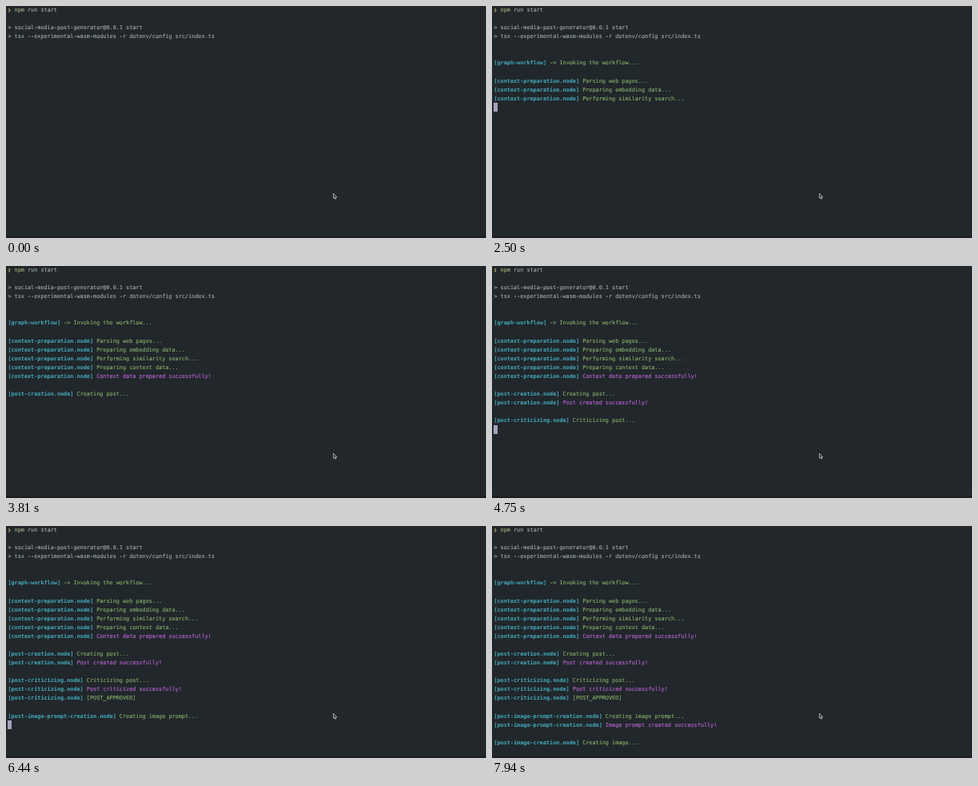
An HTML page that plays this animation: 600 by 290 pixels, repeating every 8 s.

```html
<!DOCTYPE html>
<html lang="en">
<head>
<meta charset="utf-8">
<title>Terminal run</title>
<style>
  :root { --row: 11.08px; --loop: 8s; }

  html, body {
    margin: 0;
    width: 100%;
    height: 100%;
    overflow: hidden;
    background: #21272b;
  }

  .stage {
    position: relative;
    width: 600px;
    height: 290px;
    overflow: hidden;
    background: #21272b;
  }

  /* The log grows by whole rows; the caret sits on the row below it. */
  .log {
    position: absolute;
    left: 2.4px;
    top: 0;
    width: 590px;
    animation: print var(--loop) step-end infinite;
  }

  pre {
    margin: 0;
    height: 100%;
    overflow: hidden;
    font: 6.827px/var(--row) "DejaVu Sans Mono", "Noto Sans Mono", monospace;
    text-rendering: geometricPrecision;
    color: #a9afb3;
    -webkit-text-stroke: .1px currentColor;
  }

  b { color: #45abbd; -webkit-text-stroke: 0; }
  i { font-style: normal; color: #8bb56c; }
  em { font-style: normal; color: #ab5fc2; -webkit-text-stroke: .2px currentColor; }
  .cmd { color: #adb87c; }

  .sign {
    display: inline-block;
    width: 4.11px;
    font-size: 5.6px;
    line-height: 1;
    color: #c6bb60;
    -webkit-text-stroke: .3px currentColor;
  }

  .caret {
    position: absolute;
    left: 0;
    top: calc(100% - .5px);
    width: 4.5px;
    height: 10.8px;
    background: #a5a3c0;
    animation: blink var(--loop) linear infinite;
  }

  .edge {
    position: absolute;
    left: 0;
    bottom: 0;
    width: 100%;
    height: 2px;
    background: #1a1c1f;
  }

  .pointer { position: absolute; left: 408px; top: 233px; }

  @keyframes print {
    0%      { height: calc(4 * var(--row)); }
    .75%    { height: calc(9 * var(--row)); }
    21.875% { height: calc(10 * var(--row)); }
    26.625% { height: calc(11 * var(--row)); }
    38.25%  { height: calc(15 * var(--row)); }
    56.25%  { height: calc(18 * var(--row)); }
    66.375% { height: calc(22 * var(--row)); }
    87.875%, 100% { height: calc(25 * var(--row)); }
  }

  /* Soft blink, one second long, restarted when new rows are printed. */
  @keyframes blink {
    0%, .74%, 3.125%, 5.5%, 13.25%, 18%, 33.625%, 38.24%, 45.25%, 50%,
    63.25%, 66.37%, 73.375%, 78.125%, 85.875%, 87.87%, 94.875%, 100% { opacity: 0; }
    .75% { opacity: .75; }
    7%, 11.75%, 19.5%, 32.125%, 38.25%, 43.75%, 51.5%, 61.75%,
    66.375%, 71.875%, 79.625%, 84.375%, 87.875%, 93.375% { opacity: 1; }
  }
</style>
</head>
<body>
<div class="stage">
  <div class="log">
<pre><span class="sign">❯</span> <span class="cmd">npm</span> run start

&gt; social-media-post-generator@0.0.1 start
&gt; tsx --experimental-wasm-modules -r dotenv/config src/index.ts


<b>[graph-workflow]</b> <i>-&gt; Invoking the workflow...</i>

<b>[context-preparation.node]</b> <i>Parsing web pages...</i>
<b>[context-preparation.node]</b> <i>Preparing embedding data...</i>
<b>[context-preparation.node]</b> <i>Performing similarity search...</i>
<b>[context-preparation.node]</b> <i>Preparing context data...</i>
<b>[context-preparation.node]</b> <em>Context data prepared successfully!</em>

<b>[post-creation.node]</b> <i>Creating post...</i>
<b>[post-creation.node]</b> <em>Post created successfully!</em>

<b>[post-criticizing.node]</b> <i>Criticizing post...</i>
<b>[post-criticizing.node]</b> <em>Post criticized successfully!</em>
<b>[post-criticizing.node]</b> <i>[POST_APPROVED]</i>

<b>[post-image-prompt-creation.node]</b> <i>Creating image prompt...</i>
<b>[post-image-prompt-creation.node]</b> <em>Image prompt created successfully!</em>

<b>[post-image-creation.node]</b> <i>Creating image...</i>
</pre>
    <div class="caret"></div>
  </div>
  <div class="edge"></div>
  <svg class="pointer" width="7" height="10" viewBox="0 0 7 10">
    <path d="M1.3 1.3V7.2L2.6 6L3.6 8.2L4.6 7.8L3.7 5.7H5.4Z"
          fill="#15181a" stroke="#d5d8da" stroke-width=".8" stroke-linejoin="round"/>
  </svg>
</div>
</body>
</html>
```
